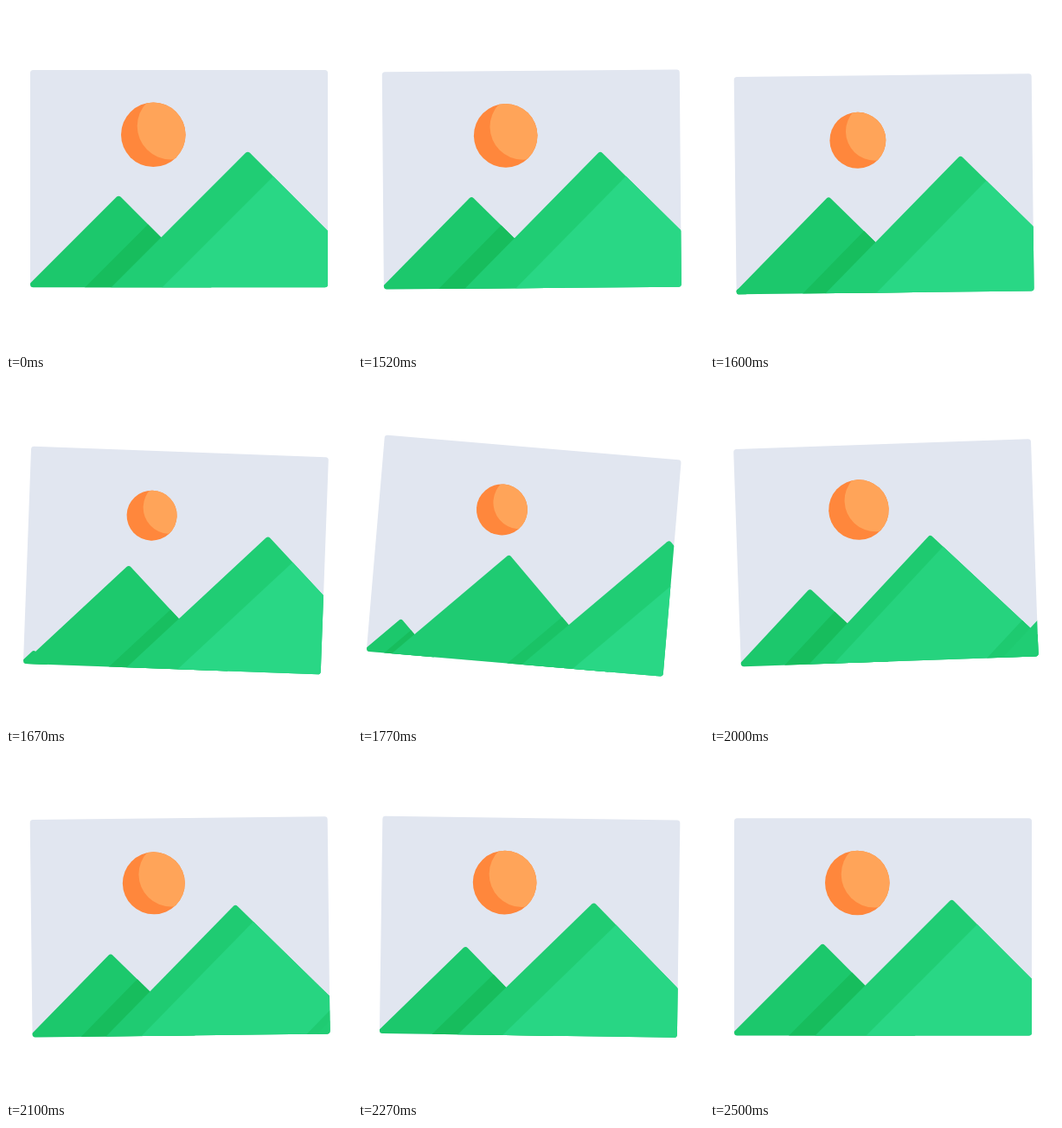
Recreate the animation shown at these times as an HTML page with a canvas. Size 400 by 400 pixels, loop 2520 ms.

```html
<!DOCTYPE html>
<html lang="en">
<head>
<meta charset="utf-8">
<title>Picture icon</title>
<style>
  html, body { margin: 0; width: 100%; height: 100%; overflow: hidden; background: #fff; }
  canvas { display: block; width: 400px; height: 400px; }
</style>
</head>
<body>
<canvas id="stage"></canvas>
<script>
const LOOP = 2520, START = 1520, STEP = 25;
const FLOOR = 340;
const PIVOT = { x: 200, y: 102 };

const canvas = document.getElementById('stage');
const ctx = canvas.getContext('2d');
const ratio = window.devicePixelRatio || 1;
canvas.width = canvas.height = 400 * ratio;

// Smooth curve through [time, value] points, flat at every extreme.
function track(times, values) {
  const last = times.length - 1;
  const slope = i => (values[i + 1] - values[i]) / (times[i + 1] - times[i]);
  const tangent = i => {
    if (i === 0 || i === last) return 0;
    const a = slope(i - 1), b = slope(i);
    return a * b <= 0 ? 0 : 2 * a * b / (a + b);
  };
  return t => {
    if (t <= times[0]) return values[0];
    if (t >= times[last]) return values[last];
    let i = 0;
    while (t >= times[i + 1]) i++;
    const h = times[i + 1] - times[i], u = (t - times[i]) / h, v = 1 - u;
    return values[i] * v * v * (1 + 2 * u) + values[i + 1] * u * u * (3 - 2 * u)
      + h * u * v * (tangent(i) * v - tangent(i + 1) * u);
  };
}

const tilt = track(
  [1500, 1555, 1670, 1767, 1900, 2005, 2100, 2210, 2420],
  [0, -1.6, 2.1, 4.85, 0.5, -2, -0.65, 1, 0]);
const drop = track([1500, 1520, 1670, 1720, 1770, 1900], [0, 0.8, 9, 8, 3.8, 0.2]);
const sunSize = track(
  [1500, 1520, 1670, 1715, 1770, 1900, 2100, 2480],
  [37.3, 36.8, 29, 28.2, 29.5, 32.8, 36, 37.3]);

const KEYS = [1515, 1670, 1770, 1900, 2100, 2500];
const growth = track(KEYS, [0, 0.13, 0.37, 0.675, 0.897, 1]);
const midX = track(KEYS, [130.2, 145.8, 183, 230.8, 264.4, 279.5]);
const midY = track(KEYS, [218.4, 206.7, 199.6, 189, 174, 167.4]);
const midShade = track(KEYS, [34, 50, 67, 88, 116, 155]);
const midLight = track([1780, 1900, 2100, 2500], [0, 7, 20.5, 29.5]);
const exitX = track(KEYS, [279.5, 305.5, 366, 447.5, 515, 550]);

const LEAF = [28, 200, 108], SHADE = [23, 189, 93];
const GRASS = [32, 205, 116], LIGHT = [41, 215, 133];
const mix = (a, b, k) => a.map((c, i) => c + (b[i] - c) * k);
const paint = c => { ctx.fillStyle = `rgb(${c.map(Math.round).join()})`; ctx.fill(); };

function disc(x, y, r) {
  ctx.beginPath();
  ctx.arc(x, y, r, 0, Math.PI * 2);
}

// 45 degree peak; each band starts at a distance down the right-hand slope.
function mountain(x, y, color, bands) {
  const h = FLOOR - y;
  ctx.beginPath();
  ctx.moveTo(x - h, FLOOR);
  ctx.arcTo(x, y, x + h, FLOOR, 3.5);
  ctx.lineTo(x + h, FLOOR);
  ctx.closePath();
  paint(color);
  for (const [d, tone] of bands) {
    if (d < 1 || d >= h) continue;
    ctx.beginPath();
    ctx.moveTo(x + d, y + d);
    ctx.lineTo(x + 2 * d - h, FLOOR);
    ctx.lineTo(x + h, FLOOR);
    ctx.closePath();
    paint(tone);
  }
}

// The crescent keeps its width while the disc changes size.
function sun(r) {
  ctx.save();
  ctx.translate(170.3, 148.8);
  disc(0, 0, r);
  paint([255, 135, 60]);
  ctx.clip();
  disc(20, -10, r + 1.3);
  paint([255, 164, 89]);
  ctx.restore();
}

function draw(t) {
  ctx.setTransform(ratio, 0, 0, ratio, 0, 0);
  ctx.fillStyle = '#fff';
  ctx.fillRect(0, 0, 400, 400);

  ctx.save();
  ctx.translate(PIVOT.x, PIVOT.y + drop(t));
  ctx.rotate(tilt(t) * Math.PI / 180);
  ctx.translate(-PIVOT.x, -PIVOT.y);

  ctx.beginPath();
  ctx.roundRect(28, 74, 344, 251.3, 3.5);
  paint([225, 230, 240]);
  ctx.clip();

  sun(sunSize(t));

  const k = growth(t);
  if (k > 0.01) {
    mountain(26.2 + 104 * k, 322.4 - 104 * k, LEAF, [[34 * k, SHADE]]);
  }
  const side = mix(SHADE, GRASS, k);
  const body = mix(LEAF, LIGHT, k ** 1.5);
  const strip = midLight(t);
  mountain(midX(t), midY(t), strip < 1 ? body : side, [[strip, body], [midShade(t), side]]);
  mountain(exitX(t), 167.4, GRASS, [[29.5, LIGHT]]);
  ctx.restore();
}

function frame() {
  const t = performance.now() % LOOP;
  const step = START + Math.floor((t - START) / STEP) * STEP;
  draw(t < START ? 0 : Math.round(step / 10) * 10);
  requestAnimationFrame(frame);
}
frame();
</script>
</body>
</html>
```
